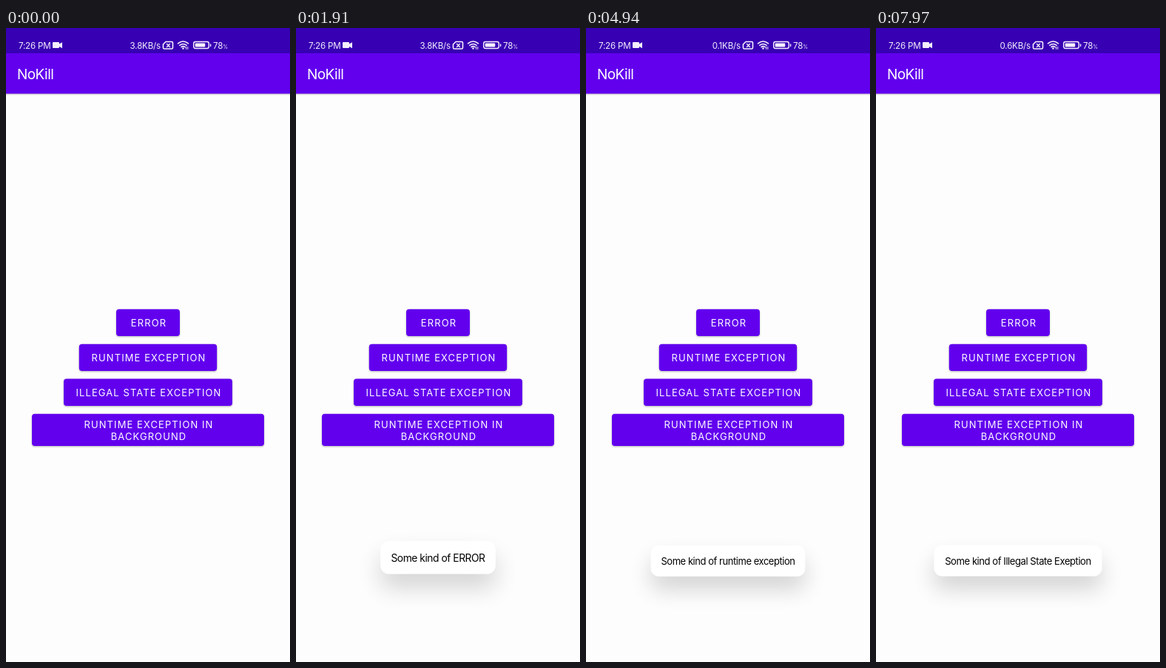
Write an HTML page that moves like this. It is 384 px wide and 854 px high and loops after 8000 ms.

```html
<!DOCTYPE html>
<html lang="en">
<head>
<meta charset="utf-8">
<title>NoKill</title>
<style>
  html, body { margin: 0; width: 100%; height: 100%; overflow: hidden; background: #fdfdfd; }
  svg { display: block; width: 384px; height: 854px; font-family: Inter, Roboto, sans-serif; }
  .status { fill: #f4f0fc; font-size: 11.6px; letter-spacing: -.2px; }
  .icon { fill: none; stroke: #f4f0fc; stroke-width: 1.6; stroke-linejoin: round; stroke-linecap: round; }
  .solid { fill: #f4f0fc; stroke: none; }
  .title { fill: #fff; font-size: 19px; letter-spacing: -.55px; }
  .button { fill: #6200ee; filter: drop-shadow(0 1.5px 1px rgba(0, 0, 0, .28)); }
  .label { fill: #fff; font-size: 13px; letter-spacing: 1.08px; text-anchor: middle; }
  .toast { fill: #fff; }
  .message { fill: #000; font-size: 13.1px; letter-spacing: -.46px; text-anchor: middle; }
</style>
</head>
<body>
<svg viewBox="0 0 384 854">
  <defs>
    <filter id="soft" x="-40%" y="-120%" width="180%" height="340%"><feGaussianBlur stdDeviation="15"/></filter>
    <linearGradient id="barShadow" x2="0" y2="1">
      <stop stop-opacity=".22"/>
      <stop offset="1" stop-opacity="0"/>
    </linearGradient>
  </defs>
  <rect width="384" height="854" fill="#fdfdfd"/>
  <rect y="88" width="384" height="3" fill="url(#barShadow)"/>
  <rect y="34" width="384" height="54.5" fill="#6200ee"/>
  <rect width="384" height="34" fill="#3700b3"/>

  <text class="status" x="17" y="28">7:26 PM</text>
  <text class="status" id="speed" x="209" y="28" text-anchor="end"></text>
  <text class="status" x="280" y="28">78<tspan font-size="7">%</tspan></text>
  <g class="icon">
    <path class="solid" d="M64 19h7q1 0 1 1v1.5l4-2.3v8l-4-2.3V26q0 1-1 1h-7q-1 0-1-1v-6q0-1 1-1z"/>
    <path d="M216 18.5h8q1.5 0 1.5 1.5v6.5q0 1.5-1.5 1.5h-10q-1.5 0-1.5-1.5v-4.5z"/>
    <path d="M217.5 21.5l4 4m0-4l-4 4" stroke-width="1.4"/>
    <path d="M232.5 20.8q7-5.6 14 0M234.8 23.3q4.7-3.7 9.4 0M237 25.6q2.5-2 5 0"/>
    <circle class="solid" cx="239.5" cy="27.5" r="1.3"/>
    <path d="M243.6 25.5v3m2.2-3v3" stroke-width="1"/>
    <rect x="253.7" y="18.5" width="20.6" height="9" rx="2.5" stroke-width="1.4"/>
    <rect class="solid" x="255.7" y="20.5" width="13.6" height="5" rx="1"/>
    <path d="M276.6 22v2.5" stroke-width="1.4"/>
  </g>
  <text class="title" x="15" y="68.8">NoKill</text>
  <g id="buttons"></g>
  <g id="toast">
    <rect id="shade" y="714" height="42" rx="11" opacity=".16" filter="url(#soft)"/>
    <rect id="card" class="toast" y="696.5" height="42" rx="11"/>
    <text id="message" class="message" x="192" y="722.5"></text>
  </g>
</svg>
<script>
const LOOP = 8000;
const $ = id => document.getElementById(id);
const clamp = v => Math.min(1, Math.max(0, v));

const buttons = [
  { x: 149, y: 378.7, w: 86, h: 36.3, lines: ['ERROR'], press: 1520 },
  { x: 98.8, y: 425.7, w: 186.4, h: 36.3, lines: ['RUNTIME EXCEPTION'], press: 4400 },
  { x: 78, y: 472.6, w: 228, h: 36.4, lines: ['ILLEGAL STATE EXCEPTION'], press: 7130 },
  { x: 35, y: 519.7, w: 314, h: 43.3, lines: ['RUNTIME EXCEPTION IN', 'BACKGROUND'] }
];
const toasts = [
  { start: 1750, width: 147, text: 'Some kind of ERROR' },
  { start: 4600, width: 210, text: 'Some kind of runtime exception' },
  { start: 7330, width: 227, text: 'Some kind of Illegal State Exeption' }
];
const TOAST_HOLD = 1980, TOAST_FADE = 260;

$('buttons').innerHTML = buttons.map(({ x, y, w, h, lines }, i) => {
  const box = `x="${x}" y="${y}" width="${w}" height="${h}" rx="4"`;
  const labels = lines.map((line, n) => {
    const baseline = y + h / 2 + 5.2 + (n - (lines.length - 1) / 2) * 16;
    return `<text class="label" x="193" y="${baseline}">${line}</text>`;
  });
  return `<clipPath id="clip${i}"><rect ${box}/></clipPath><rect class="button" ${box}/>
    <circle id="ripple${i}" cy="${y + h / 2}" fill="#fff" opacity="0" clip-path="url(#clip${i})"/>${labels.join('')}`;
}).join('');

function drawRipple({ x, w, press }, i, time) {
  if (press === undefined) return;
  const age = time - press;
  const grow = 1 - (1 - clamp(age / 260)) ** 2;
  const ripple = $('ripple' + i);
  ripple.setAttribute('cx', x + w * (.28 + .22 * grow));
  ripple.setAttribute('r', w * (.2 + .4 * grow));
  ripple.setAttribute('opacity', .16 * clamp(age / 75) * clamp((380 - age) / 180));
}

function drawToast(time) {
  const toast = toasts.find(({ start }) => time >= start && time < start + TOAST_HOLD + TOAST_FADE);
  $('toast').style.display = toast ? '' : 'none';
  if (!toast) return;
  const age = time - toast.start;
  const leave = clamp((age - TOAST_HOLD) / TOAST_FADE);
  // The card springs open from a point below it, then shrinks slightly as it fades.
  const scale = 1 - .4 * Math.exp(-age / 84) * Math.cos(2 * Math.PI * age / 320) - .12 * leave ** 2;
  $('toast').setAttribute('transform', `translate(192 788) scale(${scale}) translate(-192 -788)`);
  $('toast').setAttribute('opacity', clamp(age / 120) * (1 - leave));
  for (const id of ['card', 'shade']) {
    $(id).setAttribute('x', 192 - toast.width / 2);
    $(id).setAttribute('width', toast.width);
  }
  $('message').textContent = toast.text;
}

function frame(now) {
  const time = now % LOOP;
  $('speed').textContent = (time < 3450 ? '3.8' : time < 7450 ? '0.1' : '0.6') + 'KB/s';
  buttons.forEach((button, i) => drawRipple(button, i, time));
  drawToast(time);
  requestAnimationFrame(frame);
}
frame(0);
</script>
</body>
</html>
```
